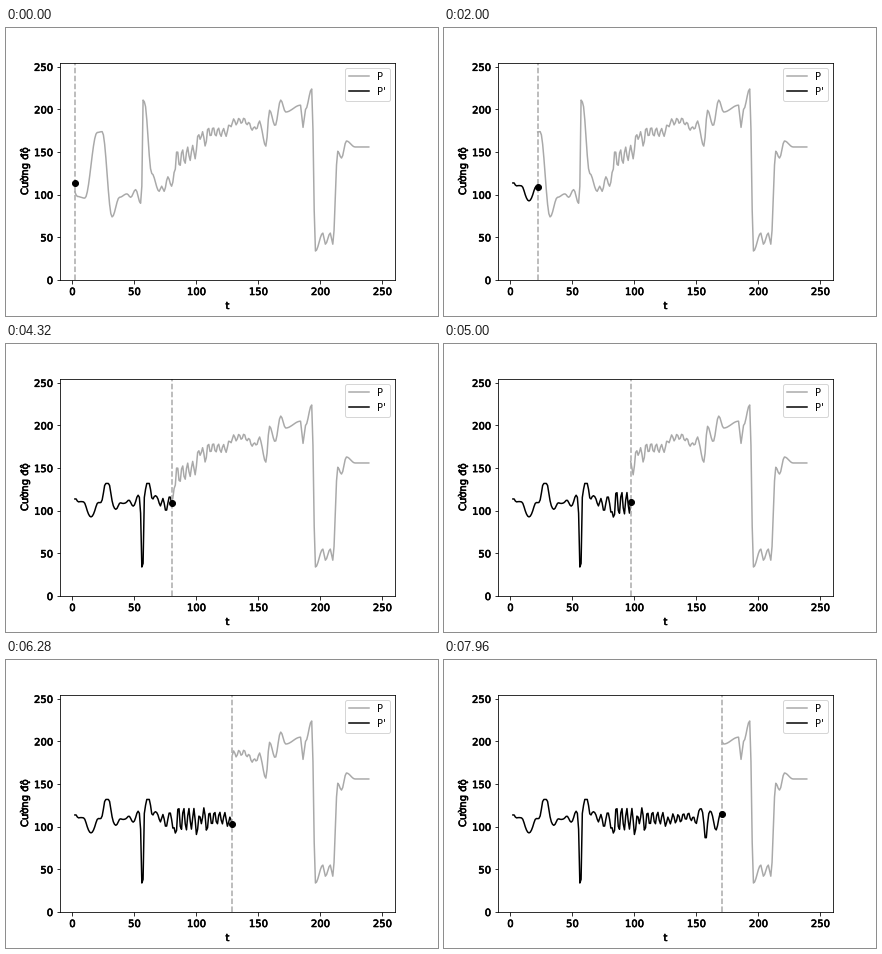
A matplotlib script that plays this animation: 432x288 px, repeating every 8 s.

```python
import numpy as np
import matplotlib.pyplot as plt
from matplotlib.animation import FuncAnimation
from matplotlib.patheffects import withStroke

plt.rcParams.update({
    "font.family": "DejaVu Sans",
    "font.size": 10,
    "figure.subplot.bottom": 0.125,
    "figure.subplot.top": 0.88,
})

FRAMES, INTERVAL = 200, 40
FIRST = 2      # first sample that has a value
HOLD = 28      # frames the cursor lags behind the frame counter
GRAY = "#a9a9a9"

# Key points (t, intensity) where the signal levels off or turns
KEYS = [
    (1, 105), (4, 98), (10, 96), (20, 173), (24, 174), (32, 74), (38, 97),
    (44, 101), (47, 97), (51, 106), (55, 90), (56, 110), (57, 211),
    (58, 209), (64, 125), (70, 104), (72, 110), (74, 104), (77, 121),
    (80, 110), (84, 142), (99, 150), (103, 172), (107, 163), (110, 174),
    (124, 173), (129, 185), (138, 187), (147, 177), (151, 184), (156, 157),
    (159, 199), (163.5, 181), (168, 211), (172, 197), (184, 205),
    (186, 179), (188, 200), (193, 224), (196, 34), (202, 55), (204, 42),
    (208, 55), (210, 42), (214, 151), (217, 143), (221, 163), (228, 156),
]


def ease(t, keys):
    """Join the key points with half cosine waves."""
    x, y = np.array(keys).T
    i = np.clip(np.searchsorted(x, t, "right") - 1, 0, len(x) - 2)
    u = np.clip((t - x[i]) / (x[i + 1] - x[i]), 0, 1)
    return y[i] + (y[i + 1] - y[i]) * (1 - np.cos(np.pi * u)) / 2


def ripple(t):
    """Decaying oscillation on the rising part of the signal."""
    wave = 11 * np.exp((84 - t) / 45) * np.cos(2 * np.pi * (t - 84.5) / 4.15)
    return np.where((t > 82) & (t < 152), wave, 0)


t = np.arange(240)
p = ease(t, KEYS) + ripple(t)
# The processed signal falls where P rises and the other way round
p_new = np.clip(110 - 1.45 * np.gradient(p), 34, 132)

fig, ax = plt.subplots(figsize=(6, 4), dpi=72, facecolor="white")
ax.set(xlim=(-10, 260), ylim=(0, 255), xlabel="t", ylabel="Cường độ")
ax.set_xticks(range(0, 251, 50))
ax.set_yticks(range(0, 251, 50))
for axis in (ax.xaxis, ax.yaxis):
    for text in [axis.label, *axis.get_ticklabels()]:
        text.set_path_effects([withStroke(linewidth=0.6, foreground="black")])

rest, = ax.plot([], [], color=GRAY, lw=1.5, label="P")
done, = ax.plot([], [], color="black", lw=1.5, label="P'")
cursor = ax.axvline(FIRST, color=GRAY, lw=1.5, ls="--")
dot, = ax.plot([], [], "o", color="black", ms=6)
ax.legend(loc="upper right")


def draw(i):
    now = max(FIRST, i - HOLD)
    rest.set_data(t[now:], p[now:])
    done.set_data(t[FIRST:now + 1], p_new[FIRST:now + 1])
    cursor.set_xdata([now, now])
    dot.set_data([now], [p_new[now]])
    return rest, done, cursor, dot


anim = FuncAnimation(fig, draw, frames=FRAMES, interval=INTERVAL,
                     init_func=lambda: draw(0), repeat=True, repeat_delay=0)
plt.show()
```
